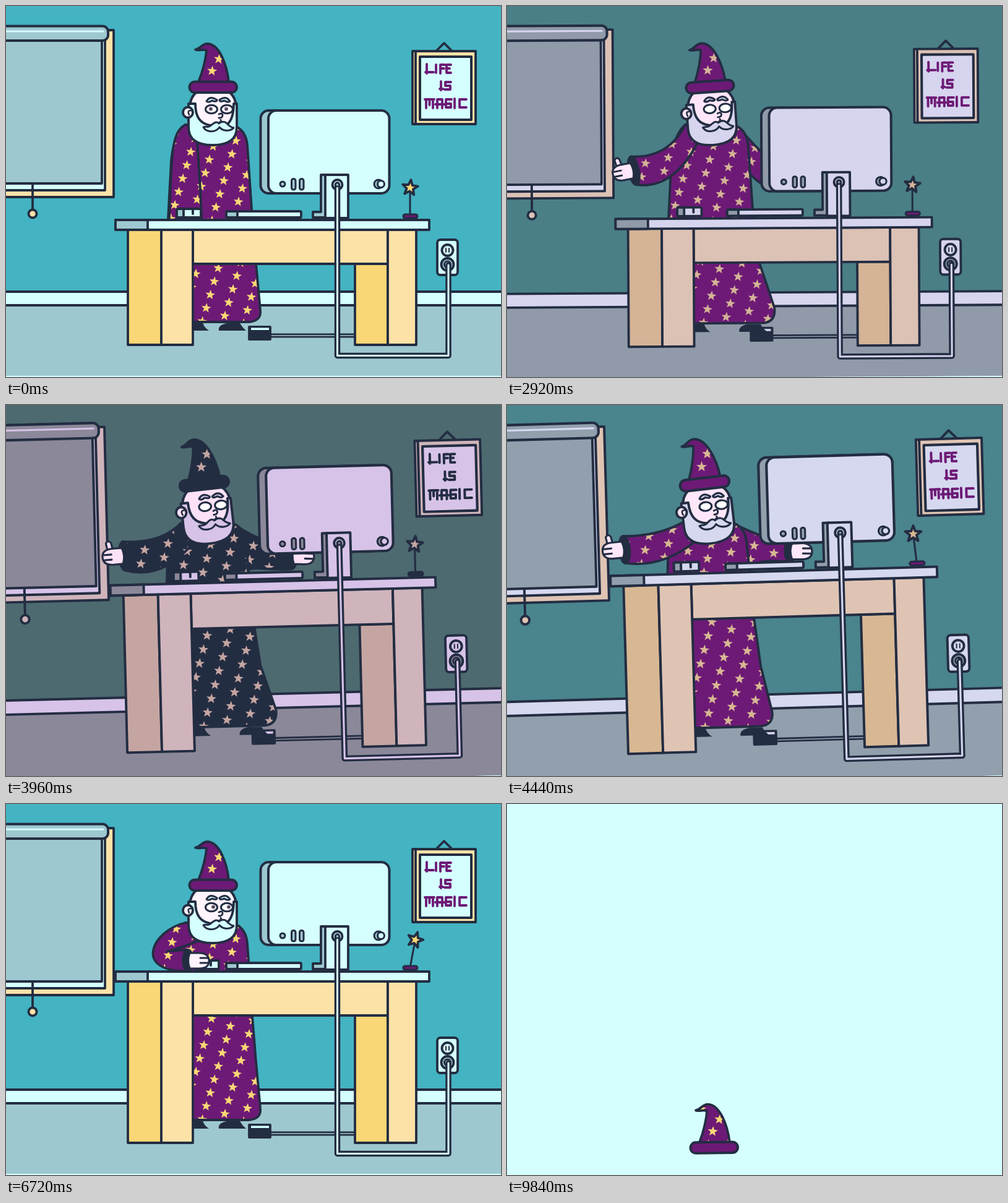
Recreate the animation shown at these times as an HTML page with a canvas. Size 800 by 600 pixels, loop 9880 ms.

```html
<!DOCTYPE html>
<html lang="en">
<head>
<meta charset="utf-8">
<title>Wizard at the desk</title>
<style>
html, body { margin: 0; height: 100%; overflow: hidden; background: #d5ffff; }
canvas { display: block; }
</style>
</head>
<body>
<canvas width="800" height="600" role="img" aria-label="A wizard raises his desk. A sign reads: Life is magic"></canvas>
<script>
const ctx = document.querySelector('canvas').getContext('2d');
const LOOP = 9880, NAVY = '#232d42', PAPER = '#d5ffff', RAD = Math.PI / 180;

// Each colour by daylight and under the spell
const SHADES = {
  wall: [[68, 179, 194], [77, 106, 112]],
  grey: [[158, 200, 208], [139, 136, 154]],
  light: [[213, 255, 255], [215, 195, 232]],
  cream: [[253, 226, 167], [207, 180, 187]],
  gold: [[250, 215, 118], [197, 165, 162]],
  skin: [[255, 243, 252], [253, 225, 247]]
};
const color = {};

// Arm pose: wrist x, y, angle, half width, then control points of the outer and inner edge
const LEFT = {
  down: [290, 365, 90, 27, 266, 205, 268, 240, 315, 310, 312, 260],
  out: [212, 278, 163, 22, 272, 234, 243, 256, 257, 298, 287, 272],
  lift: [200, 250, 177, 24, 270, 222, 240, 232, 235, 288, 272, 278],
  high: [200, 231, 176, 21, 263, 206, 233, 211, 241, 258, 276, 247],
  mouse: [294, 253, 0, 17, 235, 205, 205, 272, 245, 237, 250, 246]
};
const RIGHT = {
  down: [372, 330, 90, -14, 380, 215, 385, 280, 360, 310, 360, 280],
  out: [444, 302, 20, -17, 400, 220, 412, 270, 420, 312, 402, 296],
  lift: [466, 253, 5, -24, 395, 215, 420, 235, 430, 284, 405, 272],
  high: [457, 240, 2, -17, 395, 208, 420, 222, 430, 255, 405, 250]
};

const mix = (a, b, k) => Array.isArray(a) ? a.map((v, i) => mix(v, b[i], k)) : a + (b - a) * k;

// Eased value at time t from [time, value] keys
function track(t, ...keys) {
  const next = keys.findIndex(key => key[0] > t);
  if (next === 0) return keys[0][1];
  if (next < 0) return keys[keys.length - 1][1];
  const [t0, a] = keys[next - 1], [t1, b] = keys[next];
  const u = (t - t0) / (t1 - t0);
  return mix(a, b, u * u * (3 - 2 * u));
}

function paint(shape, fill, width = 3.8, stroke = NAVY) {
  const p = typeof shape === 'string' ? new Path2D(shape) : shape;
  if (fill) { ctx.fillStyle = fill; ctx.fill(p); }
  if (width) { ctx.lineWidth = width; ctx.strokeStyle = stroke; ctx.stroke(p); }
}

function box(x0, y0, x1, y1, fill, r = 0, width) {
  const p = new Path2D();
  p.roundRect(x0, y0, x1 - x0, y1 - y0, r);
  paint(p, fill, width);
}

function oval(x, y, rx, ry, fill, width) {
  const p = new Path2D();
  p.ellipse(x, y, rx, ry, 0, 0, 7);
  paint(p, fill, width);
}

function group(draw, x = 0, y = 0, angle = 0, px = 0, py = 0) {
  ctx.save();
  ctx.translate(x + px, y + py);
  ctx.rotate(angle * RAD);
  ctx.translate(-px, -py);
  draw();
  ctx.restore();
}

function star(x, y, r) {
  let d = '';
  for (let i = 0; i < 10; i++) {
    const a = i * Math.PI / 5 - 1.45, q = i % 2 ? r * .42 : r;
    d += `${i ? 'L' : 'M'}${x + q * Math.cos(a)} ${y + q * Math.sin(a)}`;
  }
  return d + 'Z';
}

let cloth = '';
for (let i = -8; i < 6; i++)
  for (let j = -14; j < 8; j++) cloth += star(343 + 30 * i - 6.5 * j, 424 + 12.5 * i + 21.5 * j, 8.2);
const clothStars = new Path2D(cloth);

function starry(d, stars = clothStars) {
  paint(d, color.purple, 0);
  ctx.save();
  ctx.clip(new Path2D(d));
  paint(stars, color.gold, 0);
  ctx.restore();
  paint(d);
}

function room() {
  const { wall, grey, light, cream, purple } = color;
  box(-9, -9, 809, 470, wall, 0, 0);
  box(-9, 484, 809, 598, grey, 0, 0);
  box(-9, 462, 809, 484, light);

  box(-9, 39, 174, 309, cream);
  box(-9, 50, 160, 298, light);
  box(-9, 50, 155, 287, grey);
  box(-20, 32.5, 165, 56, grey, 9, 4);
  paint('M0 41H157', null, 3, light);
  paint('M43 287V330');
  oval(43, 336, 6.5, 6.5, cream);

  paint('M696 72L708 60L720 72');
  box(657, 73, 759, 191, cream);
  paint('M662 73V191');
  box(669, 82, 752, 184, light, 0, 4);
  paint('M680 94V109M678 107H691M695 95V108M702 109V95H709M702 101H708M719 95H712V108H719M712 101H717' +
    'M703 122V136M701 134H706M719 123H710V129H718V135H709' +
    'M679 165V151H690V165M677 151H692M684.5 151V160M697 165V151H705V165M694 159H708' +
    'M720 151H711V164H719V158H714M725 150V165M744 151H733V164H744', null, 3.8, purple);

  box(697, 378, 730, 435, light, 5);
  oval(713.5, 395, 9, 9, light);
  paint('M711 392V398M716 392V398', null, 2);
  oval(713.5, 418, 10, 10, grey);
  oval(713.5, 418, 5, 5, light, 3);
}

function pedal() {
  paint('M428 533H566', null, 7);
  paint('M428 533H566', null, 1.5, color.grey);
  box(393, 519, 427, 539, NAVY);
  box(396, 520.5, 425, 524, color.light, 0, 0);
}

function arm([x, y, angle, half, ...c], shoulder, pit) {
  const nx = -Math.sin(angle * RAD) * half, ny = Math.cos(angle * RAD) * half;
  starry(`M${shoulder}C${c.slice(0, 4)} ${x + nx} ${y + ny}L${x - nx} ${y - ny}C${c.slice(4)} ${pit}`);
  group(() => {
    oval(0, 0, 8, Math.abs(half), NAVY);
    if (angle > 90) paint('M17 10L19 22Q23 28 27 22L25 8', color.skin, 3);
    paint('M3 -12H20Q34 -11 34 1Q34 13 18 13H3Q-2 0 3 -12Z', color.skin, 3);
    paint('M20 -4H33M20 4H33', null, 3);
  }, x, y, angle);
}

function hat(loose) {
  const stars = star(344, 86, 8.5) + star(333, 105, 8.5) +
    (loose ? star(316, 68, 7) + star(325, 125, 7) + star(357, 124, 7) : '');
  starry('M311 123C318 106 323 85 324 72C318 69 312 73 306 70.5C315 69 316 61 326 61C345 62 357 95 360 123Z', new Path2D(stars));
  box(296.5, 122.5, 373, 140, color.purple, 9, 4);
}

function head(t) {
  const { skin, light } = color;
  const open = track(t, [700, 1], [780, .1], [880, 1], [3240, 1], [3360, .15], [3680, .15], [3800, 1],
    [5560, 1], [5640, .1], [5740, 1]);
  const gaze = track(t, [5600, 0], [6100, 4]);
  const frown = track(t, [3240, 0], [3360, 6], [3680, 6], [3800, 0]);
  paint('M297 200V165C297 118 372 118 372 165V200Z', skin);
  paint('M295 158H306C306 180 314 190 330 193L358 191Q368 182 368 158H373V196Q373 225 334 225Q295 225 295 196Z', light);
  oval(294, 172, 8, 8.5, skin);
  paint('M300 169Q292 168 296 176', null, 2.5);
  for (const x of [332, 357]) {
    oval(x, 167, 9.5, 6.8 * open, '#fff', 3);
    ctx.globalAlpha = track(t, [1300, 1], [1700, 0], [4900, 0], [5300, 1]) * (open > .6);
    oval(x - 1 + gaze, 166.5, 3.2, 3.2, '#8b7390', 0);
    oval(x - 1 + gaze, 166.5, 1.5, 1.5, NAVY, 0);
    ctx.globalAlpha = 1;
  }
  group(() => paint('M324 154Q330 144 341 152Q341 156 333 153Q327 157 324 154ZM345 152Q355 144 362 154Q359 157 353 153Q345 156 345 152Z', light, 3), 0, frown);
  paint('M344 175Q350 172 350 177Q350 181 344 181M347 184Q349 187 345 188', null, 2.8);
  paint('M344 190C339 185 334 191 330 194C326 197 322 194 319 196C324 205 339 205 345 196C352 204 364 202 368 197C362 196 360 193 356 189C352 186 348 187 344 190Z', light, 3);
}

function mouse(x) {
  box(276 + x, 328, 315 + x, 342, color.light, 2);
  box(276 + x, 328, 287 + x, 342, color.grey, 2);
  paint(`M${302 + x} 328V336`);
}

function wizard(t, lift) {
  const left = track(t, [1320, LEFT.down], [2100, LEFT.out], [2500, LEFT.out], [3400, LEFT.lift], [3560, LEFT.lift],
    [4400, LEFT.high], [4500, LEFT.high], [5600, LEFT.mouse]);
  const right = track(t, [1320, RIGHT.down], [2100, RIGHT.out], [2500, RIGHT.out], [3400, RIGHT.lift], [3560, RIGHT.lift],
    [4400, RIGHT.high], [4500, RIGHT.high], [5300, RIGHT.down]);
  const foot = track(t, [2400, 0], [3000, 32], [4440, 28], [5200, 0]);
  const hem = track(t, [2400, 0], [3000, 21], [3800, 21], [4440, 11], [5200, 0]);
  const tilt = track(t, [320, 0], [800, -1.5], [1280, 0], [2100, 1.2], [2300, 1.2], [3200, -5], [4440, -5], [5240, 0]);
  const slide = track(t, [5300, 0], [6000, 29]);
  const drawMouse = () => group(() => mouse(slide), 0, -lift);

  paint('M303 525V512H318Q320 520 328 525Z', NAVY, 0);
  group(() => paint('M344 525Q342 516 357 513H378Q382 520 388 525Z', NAVY, 0), foot);
  arm(right, '372 196', '390 268');
  starry(`M290 192Q271 208 267 250L262 343V511H${393 + hem}Q${413 + hem} 509 ${411 + hem} ${492 - hem / 4}L${404 + hem * .2} 417L398 343L390 225Q388 203 372 195Z`);
  if (t > 5300) drawMouse();
  arm(left, '290 192', '309 222');
  if (t <= 5300) drawMouse();
  group(() => {
    head(t);
    if (t < 7280) hat();
  }, 0, 0, tilt, 335, 215);
}

function deskTop(t) {
  const { grey, light, gold, purple } = color;
  box(356, 332, 477, 342, light, 2);
  box(356, 332, 374, 342, grey, 2);

  box(411.5, 169, 600, 303, grey, 13, 4);
  box(424, 169, 619.5, 303, light, 13, 4);
  oval(447, 288, 4, 4, grey, 3);
  box(461.5, 279.5, 468, 297, grey, 3, 3);
  box(474.5, 279.5, 481, 297, grey, 3, 3);
  oval(602, 288, 7, 7, grey, 3);
  oval(606, 288, 5.5, 5.5, light, 3);
  paint('M509 273H520V342H496V333H509Z', grey);
  box(516, 273, 553, 343, light);
  oval(535.5, 289, 8, 8, light);

  const sway = t > 4400 ? -11 * Math.sin((t - 4400) / 494 * 2 * Math.PI) : 0;
  group(() => {
    paint('M653 300V338', null, 3);
    paint(star(653, 294, 13), gold);
  }, 0, 0, sway, 653, 340);
  box(642, 337, 665, 343, purple, 3, 3);
}

function desk(t, lift) {
  const { grey, light, cream, gold } = color, top = 362 - lift, under = 417 - lift;
  box(564, under, 617, 548, gold);
  box(302, top, 617, under, cream);
  box(617, top, 663, 548, cream);
  box(197, top, 251, 548, gold);
  box(251, top, 302, 548, cream);
  box(177, top - 16, 684, top, light);
  box(177, top - 16, 229, top, grey);
  group(() => deskTop(t), 0, -lift);
  const cable = `M535.5 ${289 - lift}V565.5H715V419`;
  paint(cable, null, 9.5);
  paint(cable, null, 3, light);
  oval(535.5, 289 - lift, 3, 3, grey, 2.5);
}

function scene(t) {
  const cam = track(t, [2320, 0], [4400, 1], [4480, 1], [5240, 0]);
  const lift = track(t, [2700, 0], [4480, 75]);
  const p = Math.max(0, (t - 7380) / 510);
  if (p >= 1) return;
  ctx.save();
  if (p) {
    const size = 1 - p * p;
    ctx.translate(326, 152);
    ctx.rotate(1.3 * p * p);
    ctx.scale(size, size * (1 - .5 * p));
    ctx.translate(-326, -152);
  }
  ctx.translate(400, 300);
  ctx.rotate(-1.63 * cam * RAD);
  ctx.scale(1 + .0414 * cam, 1 + .0414 * cam);
  ctx.translate(-400, -300);
  ctx.beginPath();
  ctx.rect(0, 0, 800, 598);
  ctx.clip();
  room();
  pedal();
  wizard(t, lift);
  desk(t, lift);
  ctx.restore();
}

function rays(t) {
  const p = (t - 7720) / 320;
  if (p <= 0 || p >= 1) return;
  const near = 12 + 30 * p, far = near + 12 * Math.sin(Math.PI * p);
  for (let i = 0; i < 11; i++) {
    const a = Math.PI / 2 + i * 2 * Math.PI / 11, c = Math.cos(a), s = Math.sin(a);
    paint(`M${326 + near * c} ${144 + near * s}L${326 + far * c} ${144 + far * s}`, null, 3);
  }
}

function looseHat(t) {
  const LAND = 8400;
  let x = track(t, [7280, 0], [7480, -7], [7960, -7], [LAND, 0]);
  let y = track(t, [7280, 0], [7480, -19]);
  let angle = track(t, [7280, 0], [7480, -9], [7960, -9], [LAND, -12]);
  if (t > 7960) y = -19 + 444 * ((t - 7960) / (LAND - 7960)) ** 2;
  if (t > LAND) {
    const age = t - LAND, u = Math.min(1, age / 240);
    angle = -12 * Math.exp(-age / 560) * Math.cos(age / 114.6);
    y = 425 - 100 * u * (1 - u) - 38 * Math.abs(Math.sin(angle * RAD));
  }
  group(() => hat(true), x, y, angle, 335, 131);
}

function frame(now) {
  const t = Math.floor(now % LOOP / 40) * 40; // 25 frames per second
  const spell = track(t, [2400, 0], [3200, 1], [4000, 1], [5100, 0]);
  for (const name in SHADES) color[name] = `rgb(${mix(...SHADES[name], spell).map(Math.round)})`;
  color.purple = spell > .8 ? NAVY : '#6d1a76';
  ctx.lineJoin = ctx.lineCap = 'round';
  ctx.fillStyle = PAPER;
  ctx.fillRect(0, 0, 800, 600);
  scene(t);
  rays(t);
  if (t >= 7280) looseHat(t);
  requestAnimationFrame(() => frame(performance.now()));
}
frame(0);
</script>
</body>
</html>
```
